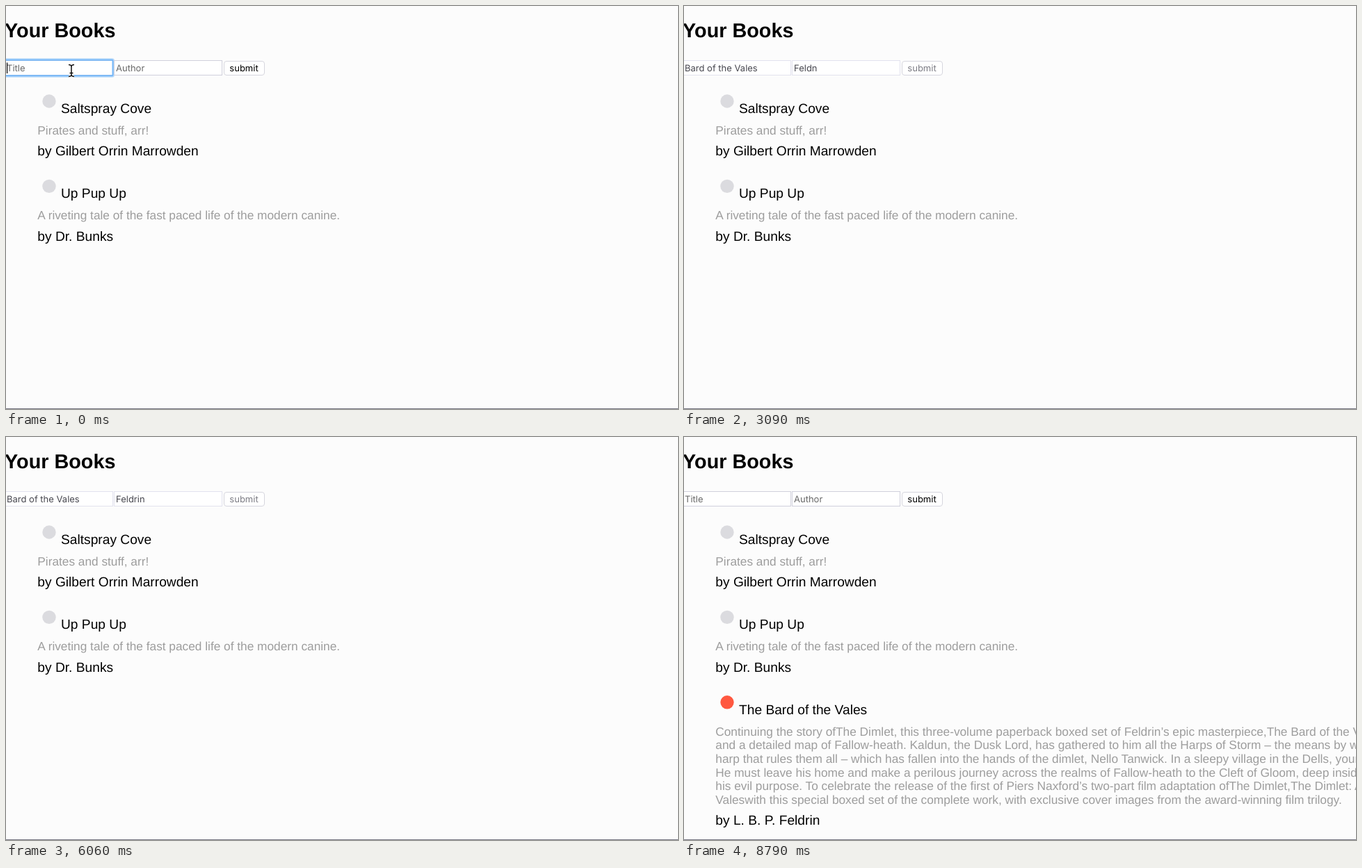
Recreate the animation shown at these times as an HTML page. Size 966 px wide and 580 px high, loop 8820 ms.

```html
<!DOCTYPE html>
<html lang="en">
<head>
<meta charset="utf-8">
<title>Your Books</title>
<style>
html, body { margin: 0; width: 966px; height: 580px; overflow: hidden; background: #fcfcfc; }
svg { display: block; text-rendering: geometricPrecision; font: 19.2px "Liberation Sans", Arial, sans-serif; }
.head { font-size: 28.8px; font-weight: bold; }
.desc { font-size: 17.28px; fill: #9d9d9d; }
.field { font: 13px Inter, Roboto, sans-serif; }
.error { fill: #dd0505; }
</style>
</head>
<body>
<svg id="stage" width="966" height="580" viewBox="0 0 966 580"></svg>
<script>
const LOOP = 8820;
const TITLE = "Bard of the Vales";
const TYPO = "Feldn";
const AUTHOR = "Feldrin";

// Moments of the session, in ms
const AT = {
  typeTitle: [280, 1480], tab: 1830, typeTypo: [1960, 2460],
  submit: 2700, error: 3100, click: 3330,
  select: 4150, retype: [4500, 5250], resubmit: 5500,
  found: 6680, mark: 8040
};

const books = [
  { title: "Saltspray Cove", author: "Gilbert Orrin Marrowden", desc: ["Pirates and stuff, arr!"] },
  { title: "Up Pup Up", author: "Dr. Bunks",
    desc: ["A riveting tale of the fast paced life of the modern canine."] },
  { title: "The Bard of the Vales", author: "L. B. P. Feldrin", desc: [
    "Continuing the story ofThe Dimlet, this three-volume paperback boxed set of Feldrin’s epic masterpiece,The Bard of the Vales,",
    "and a detailed map of Fallow-heath. Kaldun, the Dusk Lord, has gathered to him all the Harps of Storm – the means by which he",
    "harp that rules them all – which has fallen into the hands of the dimlet, Nello Tanwick. In a sleepy village in the Dells, young",
    "He must leave his home and make a perilous journey across the realms of Fallow-heath to the Cleft of Gloom, deep inside the",
    "his evil purpose. To celebrate the release of the first of Piers Naxford’s two-part film adaptation ofThe Dimlet,The Dimlet: A",
    "Valeswith this special boxed set of the complete work, with exclusive cover images from the award-winning film trilogy."
  ] }
];

const stage = document.getElementById("stage");

function add(parent, tag, attrs, text) {
  const el = document.createElementNS("http://www.w3.org/2000/svg", tag);
  set(el, attrs);
  if (text) el.textContent = text;
  parent.appendChild(el);
  return el;
}
function set(el, attrs) {
  for (const k in attrs) el.setAttribute(k, attrs[k]);
}
function show(el, on) {
  el.style.display = on ? "" : "none";
}

add(stage, "rect", { width: 966, height: 580, fill: "#fcfcfc" });
add(stage, "text", { x: -2, y: 45, class: "head" }, "Your Books");

function makeField(x, w, hint) {
  const box = add(stage, "rect", { x: x + .5, y: 78.5, width: w - 1, height: 21, fill: "#fff", stroke: "#d0d0dc" });
  const ring = add(stage, "g", { fill: "none" });
  add(ring, "rect", { x: x - .5, y: 76.8, width: w + 1, height: 24.4, rx: 2, stroke: "#b9dafa", "stroke-width": 3 });
  add(ring, "rect", { x: x + .5, y: 77.8, width: w - 1, height: 22.4, rx: 1, stroke: "#76b7f8", "stroke-width": 2 });
  const mark = add(stage, "rect", { x: x + 3, y: 81, height: 16, fill: "#b4d5fe" });
  const text = add(stage, "text", { x: x + 3, y: 94, class: "field" });
  const caret = add(stage, "rect", { y: 81.5, width: 1.2, height: 15.5, fill: "#000" });
  return { x: x + 3, hint, box, ring, mark, text, caret };
}

function drawField(f, value, focused, caretOn, busy, selected) {
  f.text.textContent = value || f.hint;
  set(f.text, { fill: !value ? "#696969" : busy ? "#484850" : "#000" });
  set(f.box, { stroke: busy ? "#e2e2ee" : "#d0d0dc" });
  show(f.ring, focused);
  show(f.mark, selected);
  show(f.caret, focused && caretOn && !selected);
  const w = value ? f.text.getComputedTextLength() : 0;
  set(f.mark, { width: w });
  set(f.caret, { x: f.x + w });
}

const titleField = makeField(-2, 156, "Title");
const authorField = makeField(155, 156, "Author");

add(stage, "rect", { x: 313.5, y: 79.5, width: 58, height: 20, rx: 3.5, fill: "#fff", stroke: "#d6d6de" });
const button = add(stage, "text", { x: 342, y: 94, class: "field", "text-anchor": "middle" }, "submit");
const error = add(stage, "text", { x: -2, y: 125, class: "error" }, "Book not found");

const list = add(stage, "g", {});
const rows = books.map((b, i) => {
  const g = add(list, "g", { transform: `translate(0 ${i * 122.4})` });
  const dot = add(g, "circle", { cx: 62, cy: 137, r: 9.7, fill: "#dbdbdf" });
  add(g, "text", { x: 79, y: 154 }, b.title);
  b.desc.forEach((line, k) => add(g, "text", { x: 45.3, y: 185 + k * 19.6, class: "desc" }, line));
  add(g, "text", { x: 45.3, y: 215.3 + (b.desc.length - 1) * 19.6 }, "by " + b.author);
  return { g, dot };
});

add(stage, "rect", { y: 579, width: 966, height: 1, fill: "#777783" });

// Mouse pointers, each drawn around its hot spot
const pointers = { beam: add(stage, "g", {}), hand: add(stage, "g", {}), arrow: add(stage, "g", {}) };
const beamPath = "M-4-8.5Q0-8.5 0-5.5V5.5Q0 8.5-4 8.5M4-8.5Q0-8.5 0-5.5M4 8.5Q0 8.5 0 5.5M-2.5 3.5h5";
add(pointers.beam, "path", { d: beamPath, fill: "none", stroke: "#fff", "stroke-width": 3.4 });
add(pointers.beam, "path", { d: beamPath, fill: "none", stroke: "#111", "stroke-width": 1.5 });
add(pointers.hand, "path", {
  d: "M-1.8 1.8a1.9 1.9 0 0 1 3.8 0V8q0-1.6 1.8-1.6t1.8 1.6q.2-1.2 1.8-1.2t1.8 1.6q.4-.8 1.5-.6t1.3 1.6V14q0 2-1.5 4.5V21H1V19Q-2 16-5.5 11.5-7 9-5 8.6q1.6 0 3.2 2.4Z",
  fill: "#fff", stroke: "#111", "stroke-width": 1.4, "stroke-linejoin": "round"
});
add(pointers.hand, "path", { d: "M3 12.5v4.5M5.7 12.5v4.5M8.4 12.5v4.5", stroke: "#111", fill: "none" });
add(pointers.arrow, "path", {
  d: "M0 0V15L3.6 11.6 6 17 8.3 16 6 10.7H11Z", fill: "#111", stroke: "#fff", "stroke-width": 1.2
});

// Start, end, from, to
const moves = [
  [0, 280, 94, 93, 94, 93],
  [3130, 3330, 94, 93, 115, 95],
  [3330, 4500, 115, 95, 115, 95],
  [7260, 7640, 74, 596, 64.3, 379.5],
  [7640, 8240, 64.3, 379.5, 64.3, 379.5],
  [8240, 8620, 64.3, 379.5, 84, 600]
];

function drawPointer(t) {
  const m = moves.find(([a, b]) => t >= a && t < b);
  let kind = "";
  if (m) {
    const [a, b, x0, y0, x1, y1] = m;
    const u = (t - a) / (b - a), e = u * u * (3 - 2 * u);
    const x = x0 + (x1 - x0) * e, y = y0 + (y1 - y0) * e;
    const onText = y < 101 || (y > 414 && y < 560);
    kind = Math.hypot(x - 62, y - 382) < 10 ? "hand" : onText ? "beam" : "arrow";
    set(pointers[kind], { transform: `translate(${x} ${y})` });
  }
  for (const k in pointers) show(pointers[k], k === kind);
}

function typed(text, t, [a, b]) {
  const n = Math.floor((t - a) / (b - a) * (text.length - 1)) + 1;
  return text.slice(0, Math.max(0, n));
}
function within(t, a, b) {
  return t >= a && t < b;
}

function draw(t) {
  const found = t >= AT.found;
  const busy = within(t, AT.submit, AT.error) || within(t, AT.resubmit, AT.found);
  const failed = within(t, AT.error, AT.resubmit);

  const title = found ? "" : typed(TITLE, t, AT.typeTitle);
  const author = found ? "" : t < AT.retype[0] ? typed(TYPO, t, AT.typeTypo) : typed(AUTHOR, t, AT.retype);
  const onTitle = t < AT.tab || within(t, AT.click, AT.select);
  const onAuthor = within(t, AT.tab, AT.submit) || within(t, AT.select, AT.resubmit);
  const selected = within(t, AT.select, AT.retype[0]);

  // The caret stays solid while keys are pressed and blinks otherwise
  const last = [0, AT.typeTitle[1], AT.tab, AT.typeTypo[1], AT.click, AT.retype[1]].filter(s => s <= t).pop();
  const typing = [AT.typeTitle, AT.typeTypo, AT.retype].some(([a, b]) => within(t, a, b));
  const caretOn = typing || (t - last) % 1000 < 500;

  drawField(titleField, title, onTitle, caretOn, busy, false);
  drawField(authorField, author, onAuthor, caretOn, busy, selected);
  set(button, { fill: busy ? "#7d7d85" : "#000" });

  show(error, failed);
  set(list, { transform: `translate(0 ${failed ? 29.4 : 0})` });
  show(rows[2].g, found);
  set(rows[2].dot, { fill: t >= AT.mark ? "#ff5840" : "#dbdbdf" });
  drawPointer(t);
}

const start = performance.now();
function tick(now) {
  draw(Math.max(0, now - start) % LOOP);
  requestAnimationFrame(tick);
}
draw(0);
requestAnimationFrame(tick);
</script>
</body>
</html>
```
